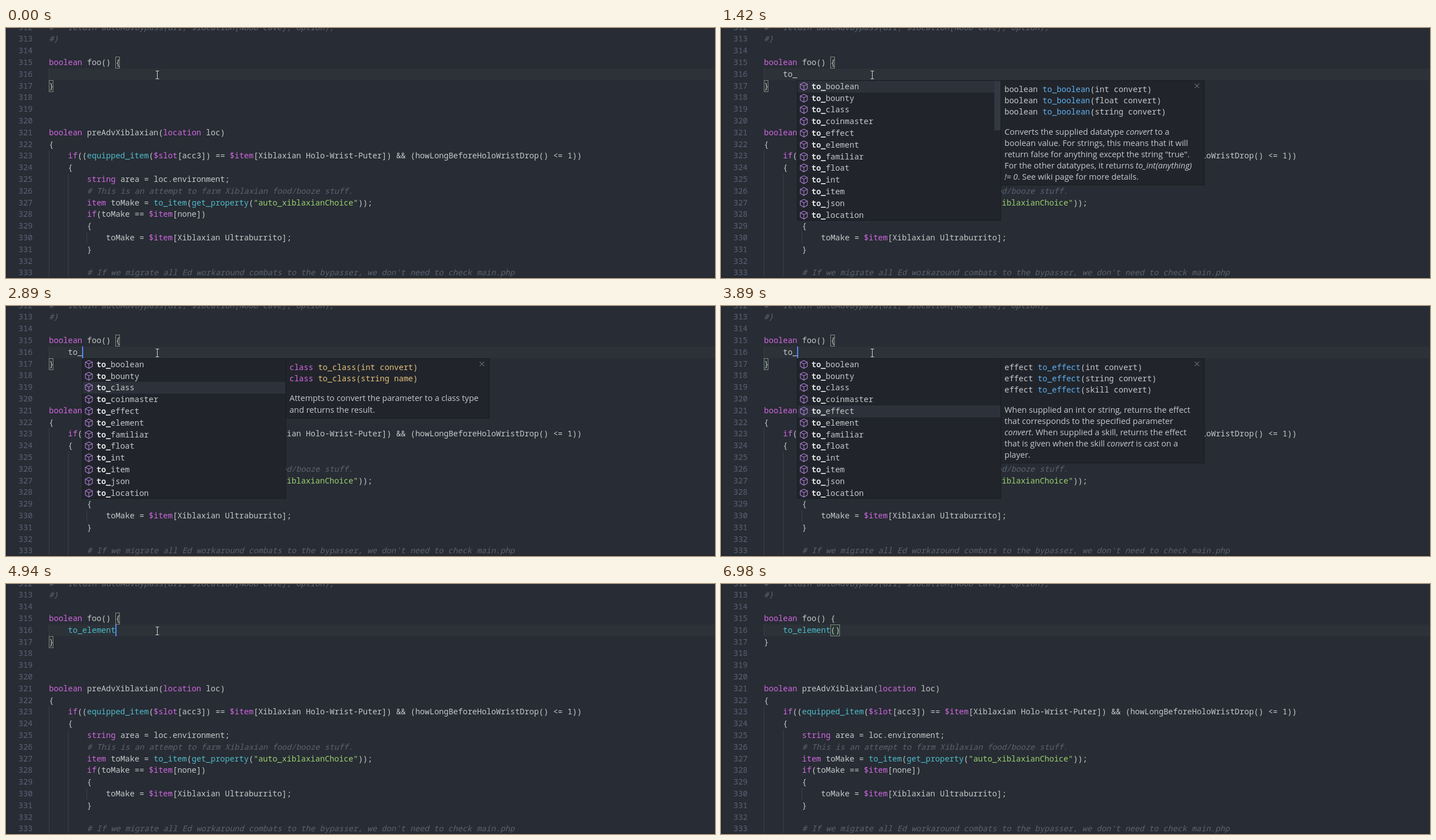
Recreate the animation shown at these times as an HTML page with a canvas. Size 1258 by 445 pixels, loop 7080 ms.

```html
<!DOCTYPE html>
<html lang="en">
<head>
<meta charset="utf-8">
<title>Code completion</title>
<style>
html, body { margin: 0; width: 100%; height: 100%; overflow: hidden; background: #282c34; }
canvas { display: block; }
</style>
</head>
<body>
<canvas id="stage" width="1258" height="445"></canvas>
<script>
const ctx = document.getElementById('stage').getContext('2d');
const LOOP = 7080, LEFT = 76.3, CHAR = 8.44, ROW = 20.8;
const MONO = '14.06px "Noto Sans Mono", "DejaVu Sans Mono", monospace';
const SANS = '14.56px "Open Sans", "Noto Sans", sans-serif';
const FG = '#c6c8cb', PURPLE = '#cf68e1', CYAN = '#4dbdcb', BLUE = '#61afef',
      GREEN = '#98d070', YELLOW = '#e5c07b', COMMENT = '#5c6370';

const FIRST = 312, TYPED = 316;
const code = `#   return autoAdvBypass(url, $location[Noob Cave], option);
#}

boolean foo() {

}



boolean preAdvXiblaxian(location loc)
{
    if((equipped_item($slot[acc3]) == $item[Xiblaxian Holo-Wrist-Puter]) && (howLongBeforeHoloWristDrop() <= 1))
    {
        string area = loc.environment;
        # This is an attempt to farm Xiblaxian food/booze stuff.
        item toMake = to_item(get_property("auto_xiblaxianChoice"));
        if(toMake == $item[none])
        {
            toMake = $item[Xiblaxian Ultraburrito];
        }

        # If we migrate all Ed workaround combats to the bypasser, we don't need to check main.php`.split('\n');

const items = 'boolean bounty class coinmaster effect element familiar float int item json location'.split(' ');

// Signature arguments and description lines; *text* is italic.
const docs = {
  boolean: [['int convert', 'float convert', 'string convert'],
    ['Converts the supplied datatype *convert* to a', 'boolean value. For strings, this means that it will',
     'return false for anything except the string "true".', 'For the other datatypes, it returns *to_int(anything)*',
     '*!= 0*. See wiki page for more details.']],
  bounty: [['int convert', 'string name'],
    ['Attempts to convert the parameter to a bounty', 'type and returns the result.']],
  class: [['int convert', 'string name'],
    ['Attempts to convert the parameter to a class type', 'and returns the result.']],
  coinmaster: [['string name'],
    ['Attempts to convert the specified *name* to a', 'coinmaster type and returns the result.']],
  effect: [['int convert', 'string convert', 'skill convert'],
    ['When supplied an int or string, returns the effect', 'that corresponds to the specified parameter',
     '*convert*. When supplied a skill, returns the effect', 'that is given when the skill *convert* is cast on a',
     'player.']],
  element: [['string name'],
    ['Attempts to convert the specified *name* to an', 'element type and returns the result.']]
};

const typing = [[0, ''], [580, 't'], [670, 'to'], [940, 'to_'], [4880, 'to_element'], [5500, 'to_element()']];
const picks = [[760, 'boolean'], [1660, 'bounty'], [2400, 'class'], [3140, 'coinmaster'],
               [3890, 'effect'], [4700, 'element'], [4880, null]];
const caretOn = [[370, 1420], [1900, 2400], [2890, 3390], [3890, 4390], [4880, 5440], [5500, 6050], [6550, 6980]];

const at = (steps, t) => (steps.filter(s => s[0] <= t).pop() || [0, null])[1];
const colX = col => LEFT + col * CHAR;
const middle = line => Math.floor(82.2 + ROW * (line - TYPED));

function rect(x, y, w, h, color) {
  ctx.fillStyle = color;
  ctx.fillRect(x, y, w, h);
}

function text(str, x, y, color, font = MONO) {
  ctx.font = font;
  ctx.fillStyle = color;
  ctx.fillText(str, x, y);
}

function stroke(color, width, ...paths) {
  ctx.strokeStyle = color;
  ctx.lineWidth = width;
  ctx.beginPath();
  for (const path of paths) path.forEach(([x, y], i) => i ? ctx.lineTo(x, y) : ctx.moveTo(x, y));
  ctx.stroke();
}

function codeLine(str, y, plain) {
  if (/^\s*#/.test(str)) {
    const col = str.search(/\S/);
    return text(str.trim(), colX(col), y, COMMENT, 'italic ' + MONO);
  }
  const token = /(\$?\b(?:boolean|location|string|item|slot|if)\b)|(\b(?:equipped_item|to_item|get_property|to_element)\b)|("[^"]*")|[^\s\w$"]+|\$|\w+/g;
  for (const m of str.matchAll(token)) {
    const color = m[1] ? PURPLE : m[2] && !plain ? CYAN : m[3] ? GREEN : FG;
    text(m[0], colX(m.index), y, color);
  }
}

function guide(col, from, to) {
  const y = middle(from) - 10;
  rect(Math.floor(colX(col)), y, 1, middle(to) + 11 - y, '#3c4049');
}

function bracket(line, col, count = 1) {
  const x = Math.floor(colX(col)), y = middle(line) - 10, w = Math.round(count * CHAR);
  rect(x, y, w, 20, 'rgba(0,100,0,.1)');
  ctx.strokeStyle = '#888888';
  ctx.lineWidth = 1;
  ctx.strokeRect(x + .5, y + .5, w - 1, 20);
}

function panel(x, y, w, h) {
  rect(x, y, w, h, '#181a1f');
  rect(x + 1, y + 1, w - 2, h - 2, '#21252b');
}

function cube(x, y) {
  stroke('#b180d7', 1.1,
    [[x, y - 7], [x + 6.2, y - 4], [x + 6.2, y + 3.5], [x, y + 7], [x - 6.2, y + 3.5], [x - 6.2, y - 4], [x, y - 7]],
    [[x - 6.2, y - 4], [x, y - .8], [x + 6.2, y - 4]], [[x, y - .8], [x, y + 7]]);
}

function richLine(str, x, y) {
  str.split('*').forEach((part, i) => {
    text(part, x, y, FG, (i % 2 ? 'italic ' : '') + SANS);
    x += ctx.measureText(part).width;
  });
}

function drawList(x, pick, prefix, scrollbar) {
  panel(x, 93, 362, 250);
  items.forEach((name, i) => {
    const y = Math.floor(104.2 + ROW * i);
    if (name === pick) rect(x + 1, y - 10, 360, 21, '#2c313a');
    cube(x + 12, y);
    const full = 'to_' + name;
    text(full.slice(0, prefix), x + 25.5, y + 5, '#e4e4e4', 'bold ' + MONO);
    text(full.slice(prefix), x + 25.5 + prefix * CHAR, y + 5, FG);
  });
  if (scrollbar) rect(x + 350, 94, 11, 88, '#333842');
}

function drawDoc(x, pick) {
  const [signatures, lines] = docs[pick], step = 20.2;
  const sigY = i => Math.floor(108.2 + step * i);
  const descY = i => Math.floor(124.4 + step * (signatures.length + i));
  panel(x, 93, 362, descY(lines.length - 1) + 15 - 93);
  const isKeyword = pick === 'class', name = 'to_' + pick;
  signatures.forEach((args, i) => {
    const y = sigY(i) + 6, nameX = x + 7 + (pick.length + 1) * CHAR;
    text(pick, x + 7, y, isKeyword ? PURPLE : FG);
    text(name, nameX, y, isKeyword ? YELLOW : BLUE);
    text(`(${args})`, nameX + name.length * CHAR, y, isKeyword ? YELLOW : FG);
  });
  lines.forEach((line, i) => richLine(line, x + 7, descY(i) + 5));
  const cx = x + 348.5, cy = 103;
  stroke('#8d9198', 1, [[cx - 4, cy - 4], [cx + 4, cy + 4]], [[cx + 4, cy - 4], [cx - 4, cy + 4]]);
}

function drawMouse(t) {
  if (t >= 6980) return;
  const step = Math.max(0, Math.min(12, Math.floor((t - 6110) / 57.3) + 1));
  const p = step / 12, e = p * p * (3 - 2 * p);
  const curve = (a, b, c) => (1 - e) * (1 - e) * a + 2 * e * (1 - e) * b + e * e * c;
  const x = Math.round(curve(268, 700, 1224)) + (t >= 6800 ? 2 : 0) + .5;
  const y = Math.round(curve(83, -12, 431));
  stroke('#d8d8d8', 1, [[x, y - 7], [x, y + 7]],
    [[x - 3, y - 6.5], [x + 3, y - 6.5]], [[x - 3, y + 7.5], [x + 3, y + 7.5]]);
}

function draw(t) {
  const typed = at(typing, t), pick = at(picks, t);
  rect(0, 0, 1258, 445, '#282c34');
  rect(0, 0, 2, 445, '#22262d');
  rect(76, 72, 1182, 21, '#2c3238');
  guide(0, 316, 316);
  guide(0, 323, 333);
  guide(4, 325, 333);
  guide(8, 330, 330);

  if (t < 5500) {
    bracket(315, 14);
    bracket(317, 0);
  } else if (t >= 5560) {
    bracket(316, 14, 2);
  }

  code.forEach((str, i) => {
    const line = FIRST + i, y = middle(line) + 5;
    text(line, 22, y, '#596275');
    codeLine(line === TYPED ? '    ' + typed : str, y, line === TYPED && t < 4940);
  });
  rect(0, 443, 1258, 2, '#24282f');

  if (caretOn.some(([from, to]) => t >= from && t < to)) {
    const col = 4 + typed.length - (t >= 5500 && t < 5560 ? 1 : 0);
    rect(Math.floor(colX(col)), 72, 2, 21, '#528bff');
  }
  if (pick) {
    const x = Math.floor(colX(4 + typed.length));
    drawDoc(x + 361, pick);
    drawList(x, pick, typed.length, t < 1660);
  }
  drawMouse(t);
}

function frame() {
  draw(performance.now() % LOOP);
  requestAnimationFrame(frame);
}
frame();
</script>
</body>
</html>
```
